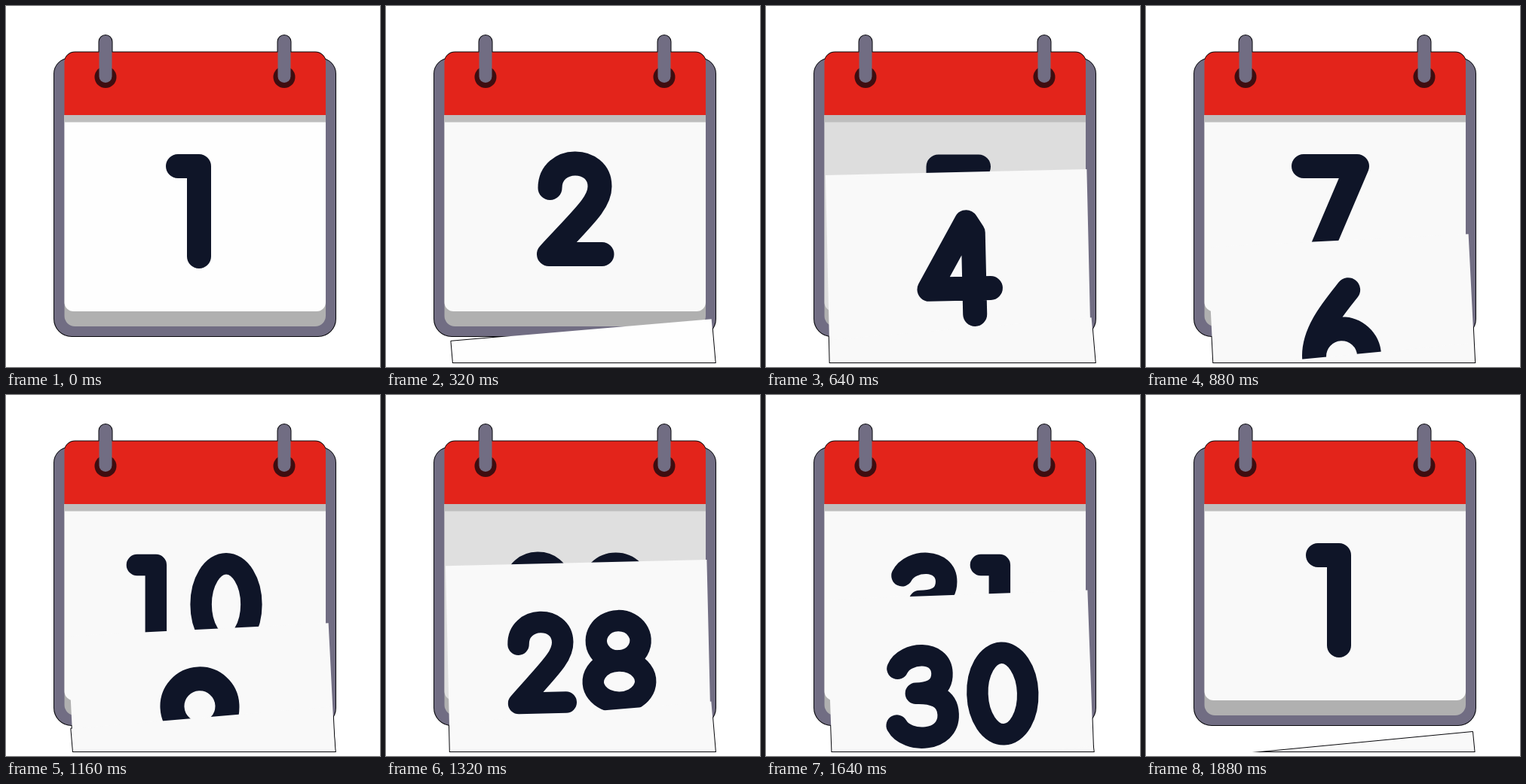
An HTML page with a canvas for the animation above (1.92 s loop, 496 px wide and 480 px high).

```html
<!DOCTYPE html>
<html lang="en">
<head>
<meta charset="utf-8">
<title>Calendar</title>
<style>
html, body { margin: 0; width: 100%; height: 100%; overflow: hidden; background: #fff; }
canvas { display: block; }
</style>
</head>
<body>
<canvas id="stage" width="496" height="480"></canvas>
<script>
const ctx = document.getElementById('stage').getContext('2d');
const LOOP = 1920, TICK = 40, FLOOR = 474;
const SLATE = '#716d83', INK = '#0f1528', OUTLINE = '#08080c';

// Rounded numerals, drawn as thick strokes
const DIGITS = [
  'M212.5 272A37.5 61 0 1 1 287.5 272A37.5 61 0 1 1 212.5 272Z',
  'M228 213H256V333',
  'M217.5 242C217.5 199 283.5 199 283.5 240C283.5 262 262 280 216 330H286.5',
  'M214 229C226 204 280 202 280 238C280 264 256 267 240 267C264 267 287 274 287 300C287 342 224 342 210 314',
  'M293 300H211.5L262.5 211.5L271.5 226V334.5',
  'M282 213.5H228.5V265C250 250 288 260 288 294C288 342 228 344 211 317',
  'M261 211C240 235 211.5 265 211.5 299A36.5 36.5 0 1 0 284.5 299A36.5 36.5 0 1 0 211.5 299',
  'M209 213H280L229 333',
  'M247 270A33 30 0 1 1 248 270A39 31 0 1 1 247 270Z',
  'M284.5 247A36.5 36.5 0 1 0 211.5 247A36.5 36.5 0 1 0 284.5 247C284.5 281 254 312 235 333'
].map(d => new Path2D(d));

// number on the page, frame at which it drops, pixels per frame
const PAGES = [
  [1, 1.5, 52], [2, 7.2], [3, 11], [4, 13.93], [5, 15.5], [6, 17.65], [7, 20.1],
  [8, 23], [9, 24.65], [10, 27.1], [28, 29.9], [29, 33.22], [30, 36.3], [31, 39.5], [1, 99]
].map(([num, start, speed = 71]) => ({ num, start, speed }));

const OFFSETS = { 10: [-29, 69.5], 31: [-10, 82] };

const rounded = (x, y, w, h, r) => {
  const p = new Path2D();
  p.roundRect(x, y, w, h, r);
  return p;
};
const disc = (x, y, r) => rounded(x - r, y - r, 2 * r, 2 * r, r);

const frame = rounded(64, 70, 373, 369, [20, 20, 23, 23]);
const stack = rounded(77.5, 145, 346.5, 281, [0, 0, 14, 14]);
const sheet = rounded(77.5, 145, 346.5, 261, [0, 0, 12, 12]);
const header = rounded(77.5, 61.5, 346.5, 83.5, [14, 14, 0, 0]);
const rings = [132, 369].map(x => rounded(x - 8.5, 39, 17, 63, 8.5));
const holes = [132, 369].map(x => disc(x, 94.5, 14.5));

function fill(path, color) {
  ctx.fillStyle = color;
  ctx.fill(path);
}

function edge(path) {
  ctx.strokeStyle = OUTLINE;
  ctx.lineWidth = 2;
  ctx.stroke(path);
  fill(path, OUTLINE);
}

function drawNumber(num) {
  ctx.strokeStyle = INK;
  ctx.lineWidth = 32;
  ctx.lineCap = ctx.lineJoin = 'round';
  if (num < 10) return ctx.stroke(DIGITS[num]);
  const offsets = OFFSETS[num] || [-22, 84];
  [...String(num)].forEach((c, k) => {
    ctx.save();
    ctx.translate(offsets[k], 36.4);
    ctx.scale(0.89, 0.89);
    ctx.stroke(DIGITS[c]);
    ctx.restore();
  });
}

// Runs a drawing step in the coordinates of a sheet that has dropped by h
function onSheet(h, draw) {
  ctx.save();
  ctx.translate(250.5 + 0.015 * h + 5e-5 * h * h, 146 + h);
  ctx.rotate(-0.0003 * h);
  ctx.translate(-250.5, -146);
  draw();
  ctx.restore();
}

function above(y, draw) {
  ctx.save();
  ctx.beginPath();
  ctx.rect(0, 0, 496, y);
  ctx.clip();
  draw();
  ctx.restore();
}

function render(now) {
  const slot = Math.floor(now % LOOP / TICK);
  const f = slot - Math.floor((slot + 11) / 16);
  const drop = p => (f - p.start) * p.speed;
  const top = PAGES.findIndex(p => drop(p) <= 0);
  const falling = PAGES.slice(0, top).filter(p => drop(p) < 350).reverse();

  ctx.clearRect(0, 0, 496, 480);
  [frame, header, ...rings].forEach(edge);
  above(FLOOR + 1, () => falling.forEach(p => onSheet(drop(p), () => edge(sheet))));

  fill(frame, SLATE);
  fill(stack, '#b0b0b0');
  let light = top ? 249 : 254;
  if (falling.length) light = Math.max(191, Math.min(249, 197 + 1.14 * (drop(falling[0]) - 55)));
  fill(sheet, `rgb(${light},${light},${light})`);
  drawNumber(PAGES[top].num);
  fill(rounded(77.5, 145, 346.5, 9.5, 0), '#bebebe');

  above(FLOOR, () => falling.forEach(p => onSheet(drop(p), () => {
    fill(sheet, p === PAGES[0] ? '#fefefe' : '#f9f9f9');
    ctx.save();
    ctx.clip(sheet);
    drawNumber(p.num);
    ctx.restore();
  })));

  fill(header, '#e3241b');
  holes.forEach(p => fill(p, '#3f0d10'));
  rings.forEach(p => fill(p, SLATE));
}

const begin = performance.now();
function loop() {
  render(performance.now() - begin);
  requestAnimationFrame(loop);
}
loop();
</script>
</body>
</html>
```
